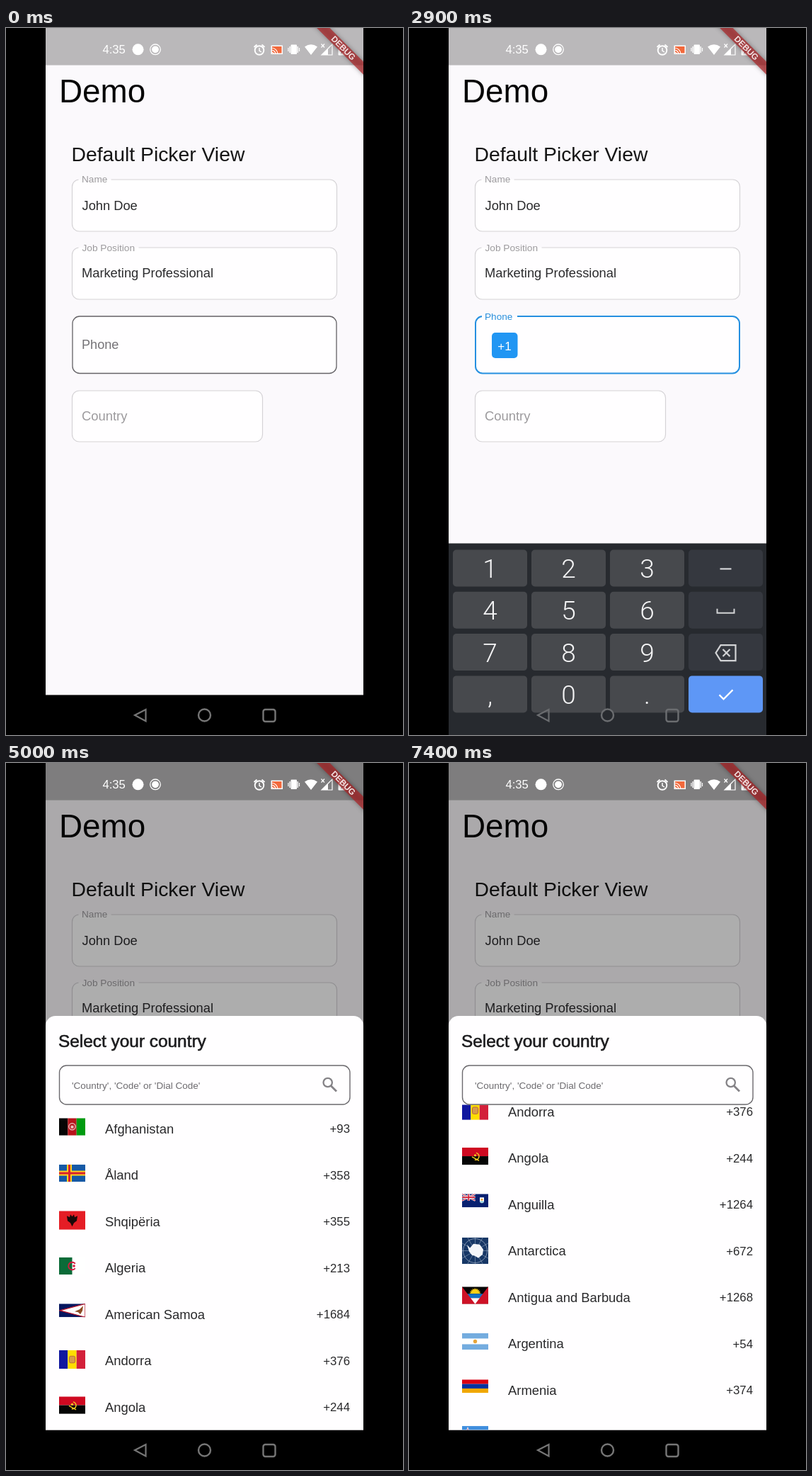
Animation, 561 px wide and 998 px high, one loop 8000 ms. Source, as an HTML page with a canvas:

```html
<!DOCTYPE html>
<html lang="en">
<head>
<meta charset="utf-8">
<title>Country picker demo</title>
<style>
html, body { margin: 0; width: 100%; height: 100%; overflow: hidden; background: #000; }
canvas { display: block; width: 561px; height: 998px; }
</style>
</head>
<body>
<canvas id="stage"></canvas>
<script>
const W = 561, H = 998, LOOP = 8000, STEP = 100;
const LEFT = 56, RIGHT = 505, BOTTOM = 941.5;
const SANS = '"Liberation Sans", Arial, sans-serif';
const BLUE = '#2196f3';
const canvas = document.getElementById('stage');
const ctx = canvas.getContext('2d');
const dpr = window.devicePixelRatio || 1;
canvas.width = W * dpr;
canvas.height = H * dpr;

const clamp = v => Math.max(0, Math.min(1, v));
const mix = (a, b, p) => a + (b - a) * p;
const easeOut = p => 1 - (1 - p) ** 3;
const span = (t, a, b) => easeOut(clamp((t - a) / (b - a)));

function track(keys, t) {
  if (t <= keys[0][0]) return keys[0][1];
  for (let i = 1; i < keys.length; i++) {
    const [t0, v0] = keys[i - 1], [t1, v1] = keys[i];
    if (t <= t1) return mix(v0, v1, (t - t0) / (t1 - t0));
  }
  return keys[keys.length - 1][1];
}

function rect(x, y, w, h, color) {
  ctx.fillStyle = color;
  ctx.fillRect(x, y, w, h);
}

function round(x, y, w, h, r, fill, stroke, width = 1) {
  ctx.beginPath();
  ctx.roundRect(x, y, w, h, r);
  paint(fill, stroke, width);
}

function paint(fill, stroke, width = 1) {
  if (fill) { ctx.fillStyle = fill; ctx.fill(); }
  if (stroke) { ctx.strokeStyle = stroke; ctx.lineWidth = width; ctx.stroke(); }
}

function disc(x, y, r, fill, stroke, width) {
  ctx.beginPath();
  ctx.arc(x, y, r, 0, Math.PI * 2);
  paint(fill, stroke, width);
}

function poly(points, fill, stroke, width, open) {
  ctx.beginPath();
  points.forEach(([x, y]) => ctx.lineTo(x, y));
  if (!open) ctx.closePath();
  paint(fill, stroke, width);
}

const line = (points, color, width) => poly(points, null, color, width, true);

function text(str, x, y, size, color, align = 'left', font = SANS, weight = 400) {
  ctx.font = `${weight} ${size}px ${font}`;
  ctx.textAlign = align;
  ctx.fillStyle = color;
  ctx.fillText(str, x, y);
}

// Flags: drawn from their own top left corner, 37 px wide.
const FW = 37;

function bars(colors, h, upright) {
  const n = colors.length;
  colors.forEach((c, i) => upright
    ? rect(i * FW / n, 0, FW / n, h, c)
    : rect(0, i * h / n, FW, h / n, c));
}

function cross(x, y, w, h, size, color) {
  rect(x - size / 2, 0, size, h, color);
  rect(0, y - size / 2, w, size, color);
}

function jack(w, h) {
  for (const [color, size] of [['#fff', 2.4], ['#d22036', 1]]) {
    line([[0, 0], [w, h]], color, size);
    line([[w, 0], [0, h]], color, size);
  }
  cross(w / 2, h / 2, w, h, 3.4, '#fff');
  cross(w / 2, h / 2, w, h, 1.8, '#d22036');
}

const flags = {
  afghanistan(h) {
    bars(['#050505', '#b8141c', '#009a10'], h, true);
    disc(18.5, 12, 4.6, null, '#efc9c9', 1.3);
    rect(16.5, 10.5, 4, 4, '#e8bcbc');
  },
  aland(h) {
    rect(0, 0, FW, h, '#1659a5');
    cross(14.5, h / 2, FW, h, 7, '#ffd21f');
    cross(14.5, h / 2, FW, h, 3, '#d8202f');
  },
  albania(h) {
    rect(0, 0, FW, h, '#e51d25');
    poly([[11, 7], [15, 9], [16, 5], [18.5, 8], [21, 5], [22, 9], [26, 7], [25, 14],
      [21, 17], [18.5, 22], [16, 17], [12, 14]], '#1b0808');
  },
  algeria(h) {
    rect(0, 0, FW, h, '#fff');
    rect(0, 0, FW / 2, h, '#0b6b38');
    ctx.beginPath();
    ctx.arc(18.5, h / 2, 5.3, .65, Math.PI * 2 - .65);
    paint(null, '#d4183b', 1.9);
    disc(21, h / 2, 1.8, '#d4183b');
  },
  samoa(h) {
    rect(0, 0, FW, h, '#06175f');
    poly([[FW, 0], [1, h / 2], [FW, h]], '#fff', '#b5152a', 1.3);
    poly([[22, 11], [29, 8], [34, 3], [33, 10], [30, 15], [27, 12]], '#8e4c24');
  },
  andorra(h) {
    bars(['#10179f', '#fedd00', '#d3203a'], h, true);
    round(14.5, 8.5, 8, 9.5, 2, '#d99c48', '#b96b39', 1);
  },
  angola(h) {
    bars(['#cf0921', '#050505'], h);
    ctx.beginPath();
    ctx.arc(19, 12.5, 5, -1.4, 1.8);
    paint(null, '#f6c921', 1.5);
    line([[14, 13], [24, 18.5]], '#f6c921', 1.5);
    disc(18.5, 11, 1.6, '#f6c921');
  },
  anguilla(h) {
    rect(0, 0, FW, h, '#082070');
    jack(18.5, h / 2);
    round(25, 5, 6, 8, [0, 0, 3, 3], '#fff');
    rect(25.5, 10.5, 5, 1.5, '#63bccd');
    disc(28, 8, 1.5, '#ee9b2c');
  },
  antarctica(h) {
    rect(0, 0, FW, h, '#173766');
    for (let i = 0; i < 6; i++) {
      const a = i * Math.PI / 6, dx = 25 * Math.cos(a), dy = 25 * Math.sin(a);
      line([[18.5 - dx, h / 2 - dy], [18.5 + dx, h / 2 + dy]], '#91a4be', .6);
    }
    disc(18.5, h / 2, 17, null, '#a9b7cc', .7);
    poly([[7, 10], [11, 15], [16, 9], [25, 10], [30, 17], [29, 24], [23, 29], [18, 26],
      [14, 25], [10, 20]], '#f4f6fa');
  },
  antigua(h) {
    rect(0, 0, FW, h, '#050505');
    ctx.beginPath();
    for (let i = 0; i <= 20; i++) {
      const a = Math.PI + i * Math.PI / 20, r = i % 2 ? 8.5 : 6;
      ctx.lineTo(18.5 + r * Math.cos(a), 10 + r * Math.sin(a));
    }
    paint('#fcd116');
    rect(0, 10, FW, 6, '#0f72c6');
    rect(0, 16, FW, h - 16, '#fff');
    poly([[0, 0], [18.5, h], [0, h]], '#ce1126');
    poly([[FW, 0], [18.5, h], [FW, h]], '#ce1126');
  },
  argentina(h) {
    bars(['#74acdf', '#fff', '#74acdf'], h);
    disc(18.5, h / 2, 2.7, '#e9a63a');
  },
  armenia(h) { bars(['#d90012', '#0033a0', '#f2a800'], h); },
  aruba(h) {
    rect(0, 0, FW, h, '#418fde');
    rect(0, 16, FW, 2, '#f9d616');
    rect(0, 20, FW, 2, '#f9d616');
    poly([[8, 2], [9.5, 6.5], [14, 8], [9.5, 9.5], [8, 14], [6.5, 9.5], [2, 8], [6.5, 6.5]],
      '#d8293a', '#fff', .8);
  }
};

const countries = [
  ['Afghanistan', '+93', 'afghanistan', 24.5],
  ['Åland', '+358', 'aland', 24.5],
  ['Shqipëria', '+355', 'albania', 26.5],
  ['Algeria', '+213', 'algeria', 24.5],
  ['American Samoa', '+1684', 'samoa', 19],
  ['Andorra', '+376', 'andorra', 26.5],
  ['Angola', '+244', 'angola', 24.5],
  ['Anguilla', '+1264', 'anguilla', 19],
  ['Antarctica', '+672', 'antarctica', 37.5],
  ['Antigua and Barbuda', '+1268', 'antigua', 24.5],
  ['Argentina', '+54', 'argentina', 23.5],
  ['Armenia', '+374', 'armenia', 19],
  ['Aruba', '+297', 'aruba', 24.5]
];

const scroll = [[5000, 0], [5400, 50], [5900, 146], [6200, 172], [6400, 190], [6700, 258.5],
  [6900, 305], [7100, 335], [7300, 349], [7400, 351.5]];

// Outlined box; the border leaves room for a floating label.
function field(x, y, w, h, border, width, gap = 0) {
  round(x, y, w, h, 10, '#fffeff');
  ctx.save();
  ctx.beginPath();
  ctx.rect(0, 0, W, H);
  if (gap) ctx.rect(x + 9, y - 4, gap, 8);
  ctx.clip('evenodd');
  round(x, y, w, h, 10, null, border, width);
  ctx.restore();
}

function page(t) {
  const focus = span(t, 2400, 2700);
  rect(LEFT, 0, RIGHT - LEFT, BOTTOM, '#fbf9fc');
  rect(LEFT, 0, RIGHT - LEFT, 52.5, '#bab8ba');
  text('Demo', 75, 105, 45.8, '#050505');
  text('Default Picker View', 92.5, 188, 28.3, '#151515');

  field(93.5, 214, 374, 73, '#d5d3d6', 1.2, 46);
  text('Name', 107, 218, 13.6, '#9c9a9d');
  text('John Doe', 107.5, 256.5, 18.3, '#2b2b2d');
  field(93.5, 310, 374, 73, '#d5d3d6', 1.2, 85);
  text('Job Position', 107.5, 314.5, 13.7, '#9c9a9d');
  text('Marketing Professional', 107, 352, 18.3, '#2b2b2d');

  const active = focus > 0;
  field(94, 407, 373, 80.5, active ? '#2590e0' : '#646266', active ? 2 : 1.3, 50 * focus);
  text('Phone', 107, mix(453, 411.5, focus), mix(18.1, 13.6, focus), active ? '#2a8fdc' : '#757377');
  if (active) {
    ctx.globalAlpha = focus;
    round(117, 430, 36.5, 36, 5, BLUE);
    text('+1', 135, 455, 17, '#fff', 'center');
    ctx.globalAlpha = 1;
  }
  field(93.5, 512, 269, 72, '#d5d3d6', 1.2);
  text('Country', 107, 553.5, 18.4, '#9c9a9d');
}

function list(offset) {
  ctx.save();
  ctx.beginPath();
  ctx.rect(LEFT, 482.5, RIGHT - LEFT, BOTTOM - 482.5);
  ctx.clip();
  countries.forEach(([name, code, flag, h], i) => {
    const y = 516 + i * 65.5 - offset;
    if (y < 450 || y > 970) return;
    ctx.save();
    ctx.translate(75, y - Math.max(14.7, h / 2));
    ctx.beginPath();
    ctx.rect(0, 0, FW, h);
    ctx.clip();
    flags[flag](h);
    ctx.restore();
    text(name, 140, y + 6.5, 18.4, '#29292b');
    text(code, 486, y + 6, 16.8, '#29292b', 'right');
  });
  ctx.restore();
}

function sheet(t) {
  const p = span(t, 3800, 4100);
  if (!p) return;
  rect(LEFT, 0, RIGHT - LEFT, BOTTOM, `rgba(0,0,0,${.32 * p})`);
  ctx.save();
  ctx.beginPath();
  ctx.rect(LEFT, 0, RIGHT - LEFT, BOTTOM);
  ctx.clip();
  ctx.translate(0, (1 - p) * (BOTTOM - 357));
  round(LEFT, 357, RIGHT - LEFT, 600, [14, 14, 0, 0], '#fffeff');
  text('Select your country', 74, 400.5, 24.4, '#1c1c1e');
  ctx.strokeStyle = '#1c1c1e';
  ctx.lineWidth = .6;
  ctx.strokeText('Select your country', 74, 400.5);
  list(track(scroll, t));
  round(75.5, 427, 410.5, 55, 10, '#fffeff', '#6b696d', 1.4);
  text("'Country', 'Code' or 'Dial Code'", 93, 460, 13.5, '#6d6b6f');
  disc(454.7, 451, 6.2, null, '#858387', 2.3);
  line([[459, 455.5], [467, 463.5]], '#858387', 2.8);
  ctx.restore();
}

function keyboard(p) {
  if (!p) return;
  ctx.save();
  ctx.translate(0, (1 - p) * 289);
  rect(LEFT, 709, RIGHT - LEFT, 289, '#272a2f');
  const keys = '123-456_789<,0.+';
  [...keys].forEach((key, i) => {
    const col = i % 4, x = 62 + col * 111, y = 718 + Math.floor(i / 4) * 59.3;
    const cx = x + 52.5, cy = y + 26;
    round(x, y, 105, 52, 5, key === '+' ? '#5e97f6' : col === 3 ? '#35383f' : '#47494d');
    if (col < 3) text(key, cx, cy + 13.5, 37, '#f4f4f5', 'center', 'Roboto, sans-serif', 300);
    else if (key === '-') line([[cx - 8, cy + 1], [cx + 8, cy + 1]], '#e2e3e5', 2);
    else if (key === '_') line([[cx - 12, cy - 2], [cx - 12, cy + 4], [cx + 12, cy + 4], [cx + 12, cy - 2]], '#d2d3d5', 2);
    else if (key === '<') {
      poly([[cx - 14, cy + 1], [cx - 7, cy - 10], [cx + 14, cy - 10], [cx + 14, cy + 12], [cx - 7, cy + 12]], null, '#d2d3d5', 2.2);
      line([[cx - 4, cy - 4], [cx + 6, cy + 6]], '#d2d3d5', 2.2);
      line([[cx + 6, cy - 4], [cx - 4, cy + 6]], '#d2d3d5', 2.2);
    } else line([[cx - 9, cy + 1], [cx - 3, cy + 7], [cx + 10, cy - 6]], '#fff', 2.2);
  });
  ctx.restore();
}

function navBar(color) {
  poly([[182, 970], [197.5, 962], [197.5, 978.5]], null, color, 2.2);
  disc(280.5, 970, 8.5, null, color, 2.4);
  round(363.5, 962, 17, 17, 3, null, color, 2.4);
}

function statusBar(t) {
  const white = '#fff';
  text('4:35', 136.5, 36, 16.6, white);
  disc(186.5, 30.3, 8, white);
  disc(211, 30.3, 7.3, null, white, 1.3);
  ctx.globalAlpha = t >= 100 && t < 400 ? .75 : 1;
  disc(211, 30.3, 4.9, white);
  ctx.globalAlpha = 1;

  disc(358, 31.5, 6.3, null, white, 1.9);
  line([[358, 28], [358, 32], [361, 34]], white, 1.5);
  line([[350.5, 27], [354.5, 23.5]], white, 1.8);
  line([[361.5, 23.5], [365.5, 27]], white, 1.8);

  rect(374.5, 24.5, 16.5, 12.5, white);
  rect(376, 26, 13.5, 9.5, '#f2693c');
  for (const r of [3, 6, 9]) {
    ctx.beginPath();
    ctx.arc(375, 37, r, -Math.PI / 2, 0);
    paint(null, white, 1.2);
  }

  round(402.5, 23.5, 8.5, 13.5, 1, white);
  for (const d of [-1, 1]) {
    line([[406.7 + d * 5.5, 26], [406.7 + d * 5.5, 35]], white, 1.4);
    line([[406.7 + d * 7.8, 28], [406.7 + d * 7.8, 33]], white, 1.2);
  }

  ctx.beginPath();
  ctx.moveTo(431, 38);
  ctx.lineTo(422, 26.5);
  ctx.quadraticCurveTo(431, 20, 440, 26.5);
  paint(white);

  poly([[446, 38], [461, 23], [461, 38]], null, white, 1.2);
  poly([[446, 38], [455, 29], [455, 38]], white);
  line([[445.5, 22.5], [450, 27.5]], white, 1.2);
  line([[450, 22.5], [445.5, 27.5]], white, 1.2);

  round(469.5, 24, 10.5, 14.5, 1, white);
  rect(472.5, 22.3, 4.5, 2, white);
  poly([[476, 26], [472, 32], [474.5, 32], [473.5, 37], [477.5, 30.5], [475, 30.5]], '#454345');
}

function banner() {
  ctx.save();
  ctx.beginPath();
  ctx.rect(LEFT, 0, RIGHT - LEFT, H);
  ctx.clip();
  ctx.translate(476.7, 28.3);
  ctx.rotate(Math.PI / 4);
  ctx.shadowColor = 'rgba(0,0,0,.5)';
  ctx.shadowBlur = 6 * dpr;
  rect(-70, -6.5, 140, 13, 'rgba(175,32,34,.68)');
  ctx.shadowColor = 'transparent';
  text('DEBUG', 0, 4, 11.8, '#f3e4e4', 'center', SANS, 700);
  ctx.restore();
}

function touch(t) {
  const off = track(scroll, t);
  let at;
  if (t >= 2400 && t < 2500) at = [318, 445.5];
  else if (t >= 3400 && t < 3600) at = [136, 449];
  else if (t >= 5100 && t <= 5900) at = [309, 532 + 146 - off];
  else if (t >= 6300 && t <= 6700) at = [300, 570 + 258.5 - off];
  if (at) disc(at[0], at[1], 13, 'rgba(255,255,255,.6)', '#d3d9e8', 2);
}

function draw(t) {
  ctx.setTransform(dpr, 0, 0, dpr, 0, 0);
  rect(0, 0, W, H, '#000');
  const board = span(t, 2600, 3100) * (1 - span(t, 3800, 4100));
  page(t);
  sheet(t);
  keyboard(board);
  navBar(board > .2 ? '#6b6d70' : '#767676');
  statusBar(t);
  banner();
  touch(t);
}

function tick() {
  const t = performance.now() % LOOP;
  draw(Math.floor(t / STEP) * STEP);
  requestAnimationFrame(tick);
}
tick();
</script>
</body>
</html>
```
